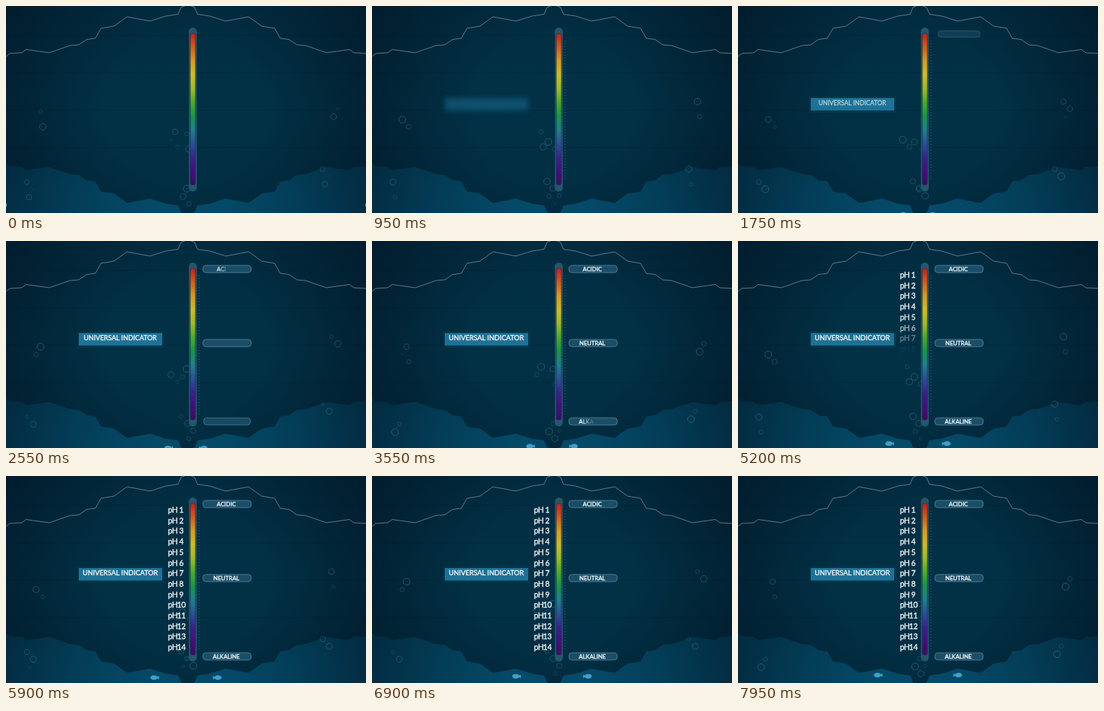
These frames come from a looping animation (500x288 px, 8 s). An HTML page with a canvas:

```html
<!DOCTYPE html>
<html lang="en">
<head>
<meta charset="utf-8">
<title>Universal indicator</title>
<style>
  html, body { margin: 0; width: 100%; height: 100%; overflow: hidden; background: #022b3e; }
  canvas { display: block; width: 100vw; height: 100vh; }
</style>
</head>
<body>
<canvas id="stage" width="500" height="288"></canvas>
<script>
const ctx = document.getElementById('stage').getContext('2d');
const W = 500, H = 288, LOOP = 8000, AXIS = 252.5;
const FONT = 'Lato, "Open Sans", sans-serif';

const ramp = (t, start, length) => Math.min(1, Math.max(0, (t - start) / length));
const easeOut = p => 1 - (1 - p) ** 2;

// Spreads the colours evenly over a gradient.
function blend(gradient, ...colors) {
  colors.forEach((color, i) => gradient.addColorStop(i / (colors.length - 1), color));
  return gradient;
}
const vertical = (top, bottom, ...colors) =>
  blend(ctx.createLinearGradient(0, top, 0, bottom), ...colors);

function roundBox(x, y, w, h, r, fill, stroke) {
  ctx.beginPath();
  ctx.roundRect(x, y, w, h, r);
  ctx.fillStyle = fill;
  ctx.fill();
  if (stroke) {
    ctx.strokeStyle = stroke;
    ctx.stroke();
  }
}

// A hairline stroke gives the lettering its medium weight.
function write(text, x, y, size, align = 'left') {
  ctx.font = `${size}px ${FONT}`;
  ctx.textAlign = align;
  ctx.lineWidth = 0.35;
  ctx.fillStyle = ctx.strokeStyle = '#f4fafc';
  ctx.fillText(text, x, y);
  ctx.strokeText(text, x, y);
}

// Left half of the rock outline; the right half mirrors it, the sea floor flips it.
const ridge = [
  [-1, 71], [5, 66], [22, 65], [28, 60.5], [60, 65], [89, 55], [101, 54], [112, 46.5],
  [124, 45], [132, 31], [150, 28], [168, 15], [200, 21], [222, 14], [239, 11.5], [243, 2], [250, -1]
];
const outline = [...ridge, ...ridge.map(([x, y]) => [2 * AXIS - x, y]).reverse()];
const ridgePath = new Path2D(), floorPath = new Path2D();
for (const [x, y] of outline) {
  ridgePath.lineTo(x, y);
  floorPath.lineTo(x, H + 1 - y);
}
floorPath.lineTo(W + 5, H + 5);
floorPath.lineTo(-5, H + 5);

const water = vertical(0, H, '#022d41', '#023145', '#022d41');
const floor = vertical(218, H, '#04435e', '#055272');
const vignette = blend(ctx.createRadialGradient(250, 144, 110, 250, 144, 300),
  'rgba(0,16,30,0)', 'rgba(0,16,30,.6)');
const spectrum = vertical(38, 249, '#d01a14', '#d85a14', '#dc9a16', '#d4bc16', '#a4bc1a',
  '#4cac22', '#149844', '#20808c', '#2c5098', '#3c2090', '#480c80', '#440860');

function drawScene() {
  ctx.lineWidth = 1;
  ctx.fillStyle = water;
  ctx.fillRect(0, 0, W, H);
  ctx.fillStyle = 'rgba(0,18,34,.1)';
  for (let y = 40; y < 200; y += 52) ctx.fillRect(0, y, W, 2);
  ctx.fillStyle = floor;
  ctx.fill(floorPath);
  ctx.fillStyle = vignette;
  ctx.fillRect(0, 0, W, H);
  ctx.strokeStyle = 'rgba(150,180,190,.6)';
  ctx.stroke(ridgePath);
}

// Each vent releases three bubbles in turn: x, y, direction of the trail, first birth in seconds.
const CYCLE = 4.4;
const vents = [
  [48, 147, -1, 2], [455, 154, 1, 3.1], [443, 248, 1, 2.8], [32, 266, 1, 2.8],
  [235, 175, -1, 2.9], [251, 178, -1, 2], [246, 265, 1, 3], [254, 275, 1, 2.4]
];
const trail = [[0, 0], [-3, -21], [6, -11]];

function drawBubbles(t) {
  for (const [x, y, dir, birth] of vents) {
    trail.forEach(([dx, dy], i) => {
      const age = (t / 1000 - birth - i * 1.4 + CYCLE * 2) % CYCLE;
      const size = ramp(age, 0, 0.4) * (1 - ramp(age, 0.6, 2.7));
      if (!size) return;
      ctx.beginPath();
      ctx.arc(x + dir * dx, y + dir * dy, 4.8 * Math.sqrt(size), 0, 7);
      ctx.strokeStyle = `rgba(80,140,165,${0.45 * Math.sqrt(size)})`;
      ctx.stroke();
    });
  }
}

function drawFish(x, y, dir) {
  ctx.save();
  ctx.translate(x, y);
  ctx.scale(dir, 1);
  ctx.fillStyle = '#3f9fc8';
  ctx.beginPath();
  ctx.ellipse(-1, 0, 5, 3.3, 0, 0, 7);
  ctx.moveTo(2, 0);
  ctx.lineTo(6, -2.5);
  ctx.lineTo(6, 2.5);
  ctx.fill();
  ctx.restore();
}

// One pair is just leaving at the sides while the next rises from the middle.
function drawFishPair(t) {
  const s = t / 1000 - 2.55;
  const leaving = t < 900;
  const x = leaving ? -5 - t / 170 : 226 - 5.8 * s;
  const y = leaving ? 277 : 288 - 2.55 * s + 0.095 * s * s;
  drawFish(x, y, 1);
  drawFish(W - x, y, -1);
}

function drawTube(t) {
  roundBox(254, 30, 11, 228, 5.5, '#24566d');
  roundBox(256, 38, 7, 211, 3, spectrum, 'rgba(10,50,70,.55)');
  for (let y = 48; y <= 240; y += 4) {
    ctx.fillStyle = `rgba(90,150,175,${0.35 * ramp(t, 100 + (y - 48) * 3, 150)})`;
    ctx.fillRect(267, y, 2, 1);
  }
}

function drawTitle(t) {
  const shown = ramp(t, 700, 500);
  if (!shown) return;
  ctx.save();
  ctx.globalAlpha = shown;
  if (shown < 1) ctx.filter = `blur(${8 * (1 - shown)}px)`;
  roundBox(101, 128, 116, 17.5, 0, '#1d7296');
  ctx.strokeStyle = 'rgba(70,130,155,.12)';
  ctx.strokeRect(99.5, 126.5, 119, 21);
  ctx.filter = 'none';
  ctx.globalAlpha = ramp(t, 1500, 400);
  ctx.translate(158.7, 135);
  const scale = 0.87 + 0.13 * easeOut(ramp(t, 1500, 2000));
  ctx.scale(scale, scale);
  write('UNIVERSAL INDICATOR', 0, 3, 9.5, 'center');
  ctx.restore();
}

function drawLabel(t, text, y, pillStart, textStart) {
  const shown = easeOut(ramp(t, pillStart, 450));
  if (!shown) return;
  ctx.save();
  ctx.translate(307, y);
  ctx.scale(0.7 + 0.3 * shown, 0.7 + 0.3 * shown);
  ctx.globalAlpha = shown;
  ctx.lineWidth = 1;
  roundBox(-33.5, -5, 67, 10, 4, '#1b4e66', '#427c98');
  ctx.restore();

  ctx.save();
  ctx.font = `8px ${FONT}`;
  const width = part => ctx.measureText(part).width;
  const left = 306 - width(text) / 2;
  [...text].forEach((letter, i) => {
    ctx.globalAlpha = ramp(t, textStart + i * 70, 250);
    write(letter, left + width(text.slice(0, i)), y + 3, 8);
  });
  ctx.restore();
}

function drawScale(t) {
  ctx.save();
  ctx.letterSpacing = '-0.3px';
  for (let i = 0; i < 14; i++) {
    const y = 51 + i * 14.7;
    ctx.globalAlpha = ramp(t, 4700 + i * 70, 250);
    write('pH', 225, y, 10.8);
    write(i + 1, 243.5, y, 10.8, 'center');
  }
  ctx.restore();
}

function draw(t) {
  drawScene();
  drawBubbles(t);
  drawFishPair(t);
  drawTube(t);
  drawTitle(t);
  drawLabel(t, 'ACIDIC', 39, 1600, 2350);
  drawLabel(t, 'NEUTRAL', 142, 1900, 2850);
  drawLabel(t, 'ALKALINE', 251, 2250, 3300);
  drawScale(t);
}

const start = performance.now();
function frame() {
  draw((performance.now() - start) % LOOP);
  requestAnimationFrame(frame);
}
frame();
</script>
</body>
</html>
```
